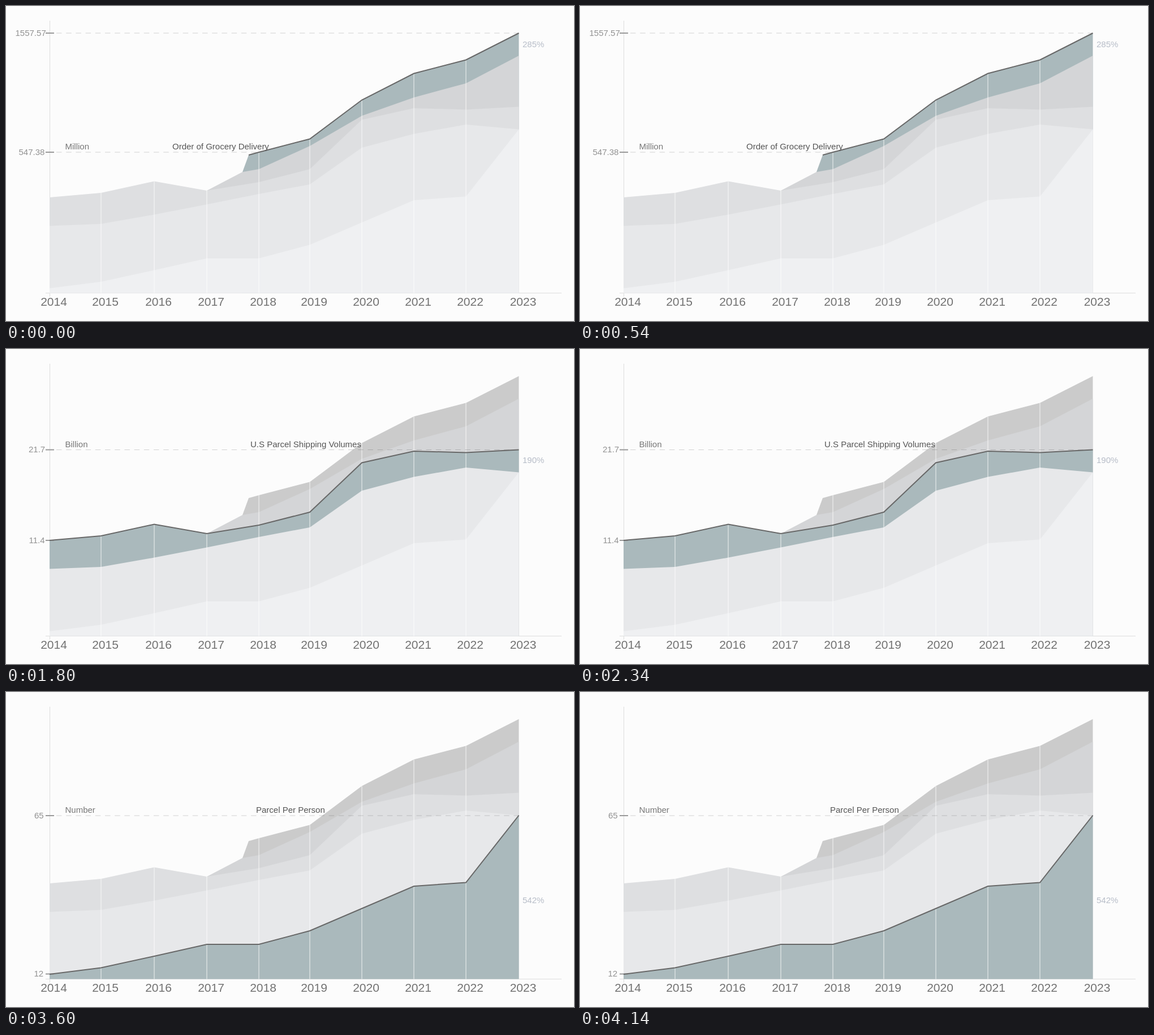
These frames come from a looping animation (1004 by 558 pixels, 4.5 s). An HTML page:

```html
<!DOCTYPE html>
<html lang="en">
<head>
<meta charset="utf-8">
<title>Delivery growth</title>
<style>
html, body { margin: 0; width: 100%; height: 100%; overflow: hidden; background: #fcfcfc; }
svg { display: block; width: 1004px; height: 558px; font: 15px "Liberation Sans", Arial, sans-serif; }
.year { font-size: 21px; fill: #727272; text-anchor: middle; }
.value { fill: #929292; }
.unit { fill: #777; }
.title { fill: #555; }
.growth { fill: #b7bdc8; }
.axis { stroke: #dedede; }
.tick { stroke: #999; stroke-width: 2; }
.dash { stroke: #000; stroke-opacity: .17; stroke-width: 1.2; stroke-dasharray: 9.5 7.7; }
.grid { stroke: #fff; stroke-opacity: .55; stroke-width: 1.5; }
.trend { fill: none; stroke: #686868; stroke-width: 2; }
</style>
</head>
<body>
<svg id="chart" viewBox="0 0 1004 558"></svg>
<script>
const chart = document.getElementById('chart');
const STEP = 900, BASE = 508.5, ACTIVE = '#aab9bc';
const xs = [77, 168, 262, 355, 447, 537, 629, 721, 813, 906.5];

const withYears = (ys, first = 0) => ys.map((y, i) => [xs[first + i], y]);

// Stacked from back to front; each area reaches the base line.
const layers = [
  {
    color: '#cbcbcb', skip: 1, title: ['Order of Grocery Delivery', 294], unit: 'Million', textY: 253.5,
    points: [[418, 294], [429, 264], ...withYears([259, 235.5, 166.5, 119.5, 95.5, 48], 4)],
    values: [['1557.57', 16.5, 48, 906], ['547.38', 22.5, 259, 447]], growth: ['285%', 73]
  },
  {
    color: '#d4d5d7', skip: 1, title: ['Order of Meal Delivery', 270], unit: 'Million', textY: 283.5,
    points: [[355, 327], [418, 294], ...withYears([289, 248, 194.5, 162, 137, 88], 4)],
    values: [['2128.69', 17.5, 88, 906], ['806.76', 22.5, 289, 447]], growth: ['263%', 140.5]
  },
  {
    color: '#dedfe1', skip: 0, title: ['U.S Parcel Shipping Volumes', 432], unit: 'Billion', textY: 173.5,
    points: withYears([339, 331, 310.5, 327, 312, 289, 201.5, 181, 183.5, 178.5]),
    values: [['21.7', 40, 178.5, 906], ['11.4', 40.5, 339]], growth: ['190%', 202]
  },
  {
    color: '#e7e8ea', skip: 0, title: ['U.S Parcel Shipping Spent', 400], unit: 'Billion', textY: 214,
    points: withYears([389.5, 386, 369.5, 351.5, 333, 316, 251, 226.5, 210, 218.5]),
    values: [['197.9', 32, 218.5, 906], ['83.9', 37.5, 389.5]], growth: ['236%', 225]
  },
  {
    color: '#eff0f2', skip: 0, title: ['Parcel Per Person', 442], unit: 'Number', textY: 214,
    points: withYears([500, 488.5, 468, 447, 447, 423, 383.5, 344, 337.5, 218.5]),
    values: [['65', 50, 219, 906], ['12', 49.5, 499.5]], growth: ['542%', 373.5]
  }
];
const tops = [331, 310.5, 327, 259, 235.5, 166.5, 119.5, 95.5];

const line = (cls, x1, y1, x2, y2) =>
  `<line class="${cls}" x1="${x1}" y1="${y1}" x2="${x2}" y2="${y2}"/>`;
const text = (cls, x, y, str) => `<text class="${cls}" x="${x}" y="${y}">${str}</text>`;

const area = ({ points, color }, active) => {
  const all = [...points, [906.5, BASE], [points[0][0], BASE]];
  return `<polygon points="${all.join(' ')}" fill="${active ? ACTIVE : color}"/>`;
};

const marker = ([str, x, y, end]) =>
  text('value', x, y + 4.7, str) + line('tick', 70, y, 85, y) +
  (end ? line('dash', 89, y, end, y) : '');

const axes = line('axis', 77.5, 26, 77.5, 515) + line('axis', 70, BASE, 982, BASE);
const grid = tops.map((y, i) => line('grid', xs[i + 1], y, xs[i + 1], BASE)).join('');
const years = xs.map((x, i) => text('year', x + 7.5, 531, 2014 + i)).join('');

function scene(n) {
  const { points, skip, title, unit, textY, values, growth } = layers[n];
  return axes +
    layers.map((layer, i) => area(layer, i === n)).join('') +
    grid + values.map(marker).join('') +
    `<polyline class="trend" points="${points.slice(skip).join(' ')}"/>` +
    text('unit', 104.5, textY, unit) + text('title', title[1], textY, title[0]) +
    text('growth', 913, growth[1], growth[0]) + years;
}

let shown = -1;
const start = performance.now();

function draw(now) {
  const n = Math.floor(Math.max(0, now - start) / STEP) % layers.length;
  if (n !== shown) chart.innerHTML = scene(shown = n);
  requestAnimationFrame(draw);
}
draw(start);
</script>
</body>
</html>
```
